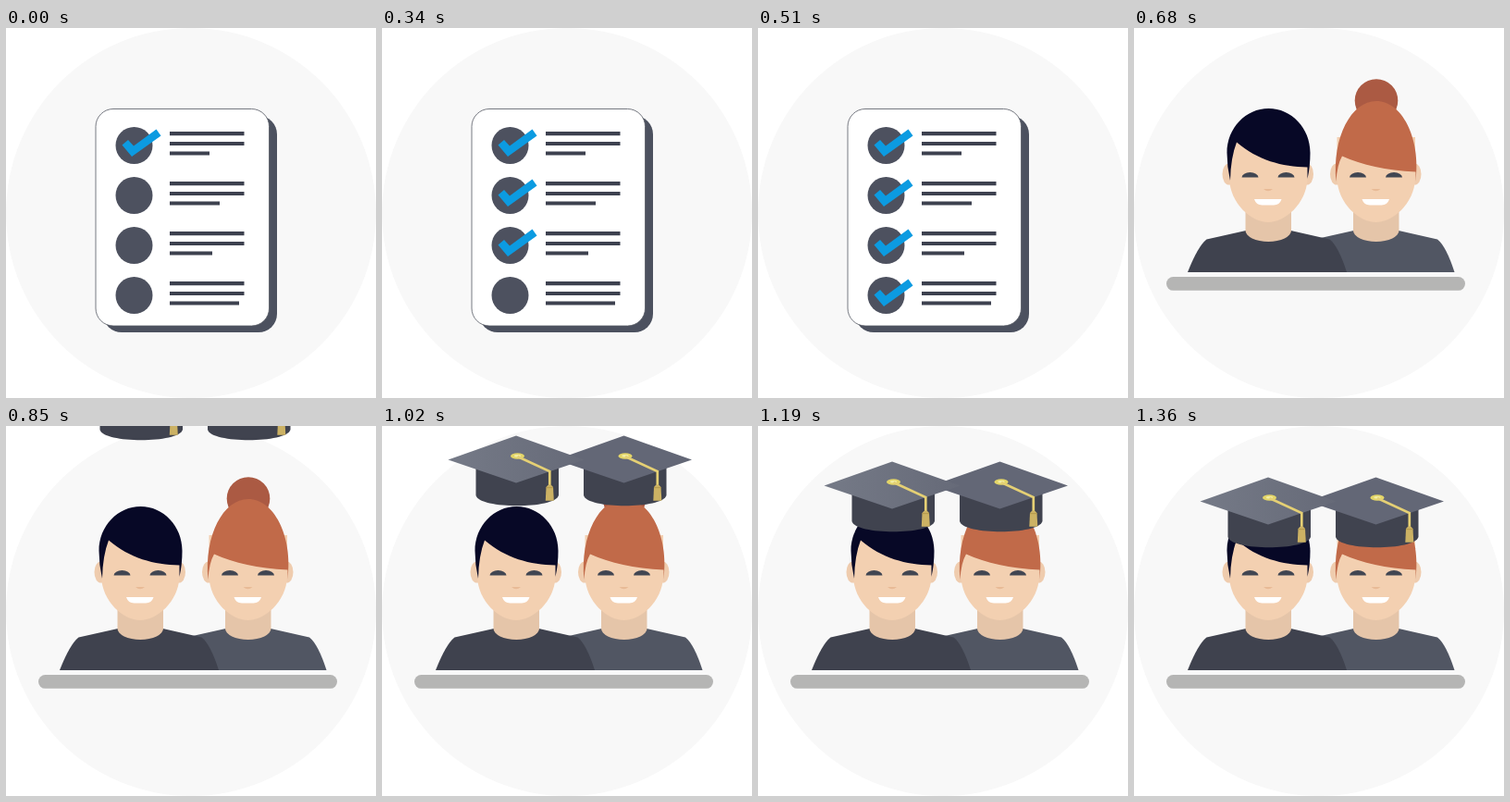
An HTML page for the animation above (3.06 s loop, 400x400 px).

```html
<!DOCTYPE html>
<html lang="en">
<head>
<meta charset="utf-8">
<title>Checklist to graduation</title>
<style>
html, body { margin: 0; width: 100%; height: 100%; overflow: hidden; background: #fff; }
svg { display: block; width: 100%; height: 100%; }
</style>
</head>
<body>
<svg viewBox="0 0 400 400">
  <defs>
    <linearGradient id="sheen">
      <stop offset="0" stop-color="#757a87"/>
      <stop offset="1" stop-color="#666a78"/>
    </linearGradient>
    <path id="tick" d="M125.5 126.5 L132 121 L138 127.5 L162.5 109.5 L167.5 116.5 L136 139 Z" fill="#0c9be1"/>
    <path id="body" d="M58 264 Q69 236 78.500 228.500 L121 219 H169.500 L211.500 228.500 Q221 236 230 264 Z"/>
    <g id="face">
      <path d="M120.500 195 H170 V219 A24.750 12 0 0 1 120.500 219 Z" fill="#e5c5a9"/>
      <g fill="#efccae">
        <ellipse cx="102.500" cy="158" rx="7" ry="11.500"/>
        <ellipse cx="187" cy="158" rx="7" ry="11.500"/>
      </g>
      <path d="M103 118 H187.500 V163 C186.500 190 163 210 145 210 C127 210 104 190 103 163 Z" fill="#f3d0b1"/>
      <path id="eye" d="M116.500 161.500 A9 5.400 0 0 1 134.500 161.500 Z" fill="#414652"/>
      <use href="#eye" x="39"/>
      <path d="M140 174 Q145 178.500 150 174 Z" fill="#e8ba96"/>
      <path d="M130 185 H159.500 Q157.500 191.500 151 191.500 H138.500 Q132 191.500 130 185 Z" fill="#fff"/>
    </g>
    <path id="board" d="M71.500 81.500 L145 55.500 L218.500 81.500 L145 106.500 Z"/>
    <path id="skull" d="M101.500 88 H191 V120 C187 135 105 135 101.500 120 Z" fill="#40434f"/>
    <g id="tassel">
      <ellipse cx="146.500" cy="77.500" rx="7.500" ry="3.200" fill="#e3d568"/>
      <ellipse cx="146.500" cy="77.200" rx="3.600" ry="1.300" fill="#f3eea6"/>
      <path d="M146.500 78 L181.300 94 V110" fill="none" stroke="#e5d074" stroke-width="2.700"/>
      <path d="M177.500 111 Q181.300 105.500 185 111 L185.800 125.800 H176.800 Z" fill="#ccb264"/>
      <path d="M177.500 111.700 H185" stroke="#b3984a"/>
    </g>
  </defs>

  <circle cx="200" cy="200" r="200" fill="#f8f8f8"/>

  <g id="list">
    <rect x="105" y="95" width="188" height="234" rx="20" fill="#4c515f"/>
    <rect x="97" y="87.500" width="187.500" height="234.500" rx="19" fill="#fff" stroke="#555963" stroke-width=".8"/>
    <g id="rows"></g>
  </g>

  <g id="people">
    <circle id="bun" cx="262" cy="78.500" r="23.300" fill="#ab5a43"/>
    <use href="#body" x="116.500" fill="#515663"/>
    <use href="#face" x="116.500"/>
    <path d="M218.500 166 C214 118 235 79 262 79 C289 79 310.500 118 304.500 166 L304.500 155.500 C272 154 247 148 225 138.500 Q219.500 148 218.500 166 Z" fill="#c16a49"/>
    <use href="#body" fill="#3f424e"/>
    <use href="#face"/>
    <path d="M104 165 Q100.500 150 100.500 135 C100.500 108 121 87 145.500 87 C170 87 190.500 108 190.500 135 Q190.500 150 187.500 163 V150.500 C160 150 134 143 111 123.500 Q104.500 140 104 165 Z" fill="#070826"/>
    <rect x="35" y="269" width="323" height="14.800" rx="7.400" fill="#b5b5b4"/>
    <g id="caps">
      <g transform="translate(116.500 0)">
        <use href="#skull"/>
        <use href="#board" fill="#636776"/>
        <use href="#tassel"/>
      </g>
      <use href="#skull"/>
      <use href="#board" fill="url(#sheen)"/>
      <use href="#tassel"/>
    </g>
  </g>
</svg>
<script>
const $ = id => document.getElementById(id);
const STEP = 170, LOOP = 3060;
const lastLine = [220, 231, 223, 252];
const capShift = [-200, -116, -45, -17, 0];

$('rows').innerHTML = lastLine.map((end, i) => `
  <g transform="translate(0 ${i * 54})">
    <circle cx="138.500" cy="127" r="20" fill="#4d515f"/>
    <path d="M177 114.200 H257.500 M177 125 H257.500 M177 135.500 H${end}" stroke="#3d414f" stroke-width="4.200"/>
    <use href="#tick" class="mark"/>
  </g>`).join('');
const marks = document.querySelectorAll('.mark');

const show = (el, on) => el.setAttribute('visibility', on ? 'visible' : 'hidden');

function draw(time) {
  const step = Math.floor((time % LOOP) / STEP);
  const people = step >= 4;
  $('list').style.display = people ? 'none' : '';
  $('people').style.display = people ? '' : 'none';
  marks.forEach((mark, i) => show(mark, i <= step));

  const drop = Math.max(0, Math.min(step - 4, 4));
  $('caps').setAttribute('transform', `translate(0 ${capShift[drop]})`);
  show($('bun'), drop < 4);
}

const start = performance.now();
function tick() {
  draw(performance.now() - start);
  requestAnimationFrame(tick);
}
tick();
</script>
</body>
</html>
```
